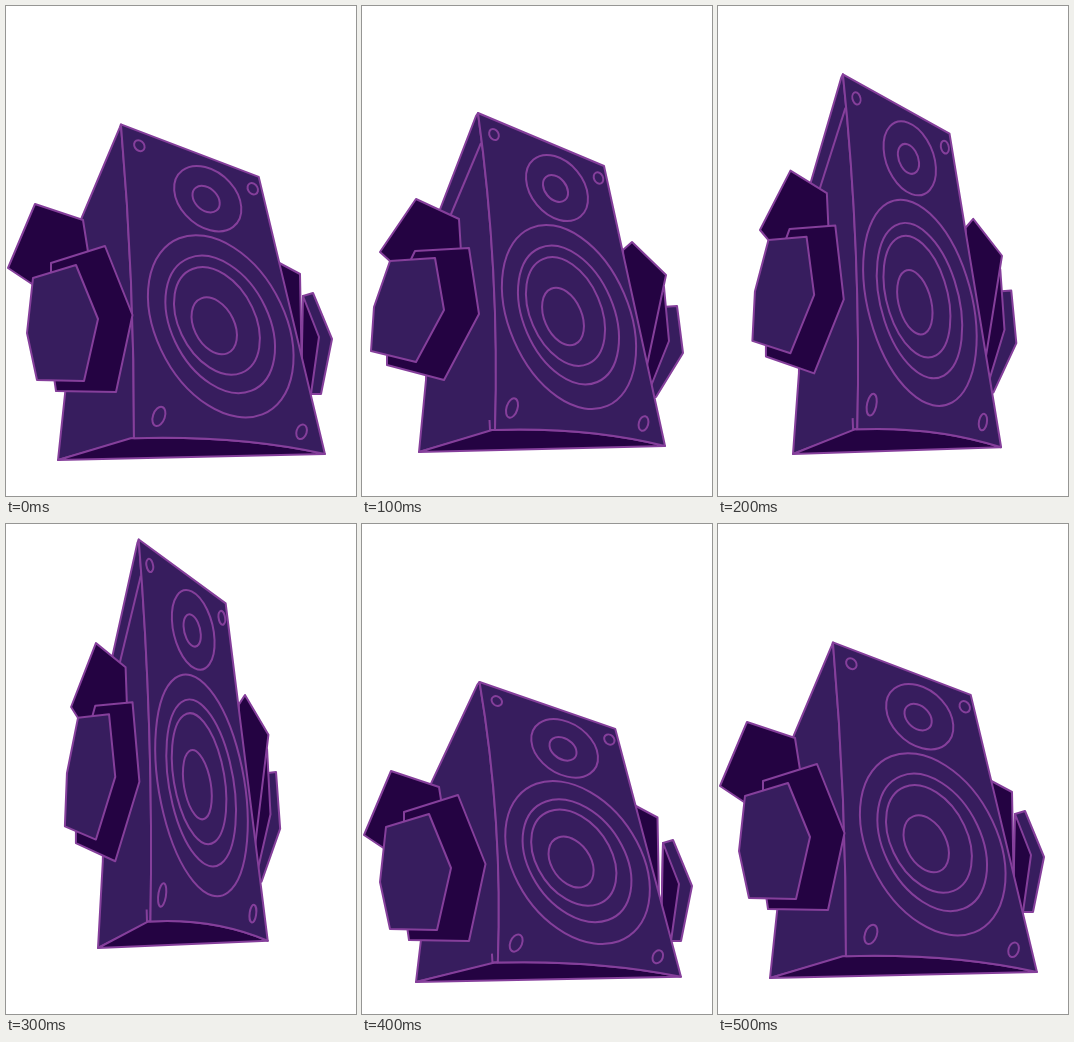
An HTML page with a canvas that plays this animation: 350 px wide and 490 px high, repeating every 600 ms.

```html
<!DOCTYPE html>
<html>
<head>
<meta charset="utf-8">
<style>
  html, body { margin: 0; height: 100%; overflow: hidden; background: #fff; }
  canvas { display: block; }
</style>
</head>
<body>
<canvas id="stage" width="350" height="490"></canvas>
<script>
const ctx = document.getElementById('stage').getContext('2d');
const LIGHT = '#371d5e', DARK = '#240342', LINE = '#853f9b';

// Each pose scales the speaker about its bottom left corner: scale x, scale y, corner x, corner y
const WIDE = [1.085, 0.99, 52, 454];
const POSES = [
  WIDE,
  [1, 1, 57, 446],
  [0.846, 1.12, 75, 448],
  [0.69, 1.205, 92, 424],
  [1.077, 0.885, 54, 458],
  WIDE
];
const STEP = 100;

// Fills and outlines SVG path data; the outline keeps its weight under scaling
function shape(d, fill, dx = 0, dy = 0) {
  const path = new Path2D();
  path.addPath(new Path2D(d), ctx.getTransform().translate(dx, dy));
  ctx.save();
  ctx.resetTransform();
  if (fill) {
    ctx.fillStyle = fill;
    ctx.fill(path);
  }
  ctx.stroke(path);
  ctx.restore();
}

function oval(x, y, rx, ry, tilt) {
  ctx.save();
  ctx.translate(x, y);
  ctx.rotate(tilt * Math.PI / 180);
  shape(`M${-rx} 0A${rx} ${ry} 0 1 1 ${rx} 0A${rx} ${ry} 0 1 1 ${-rx} 0Z`);
  ctx.restore();
}

const woofer = (x, y, s) => oval(x, y, 59.9 * s, 96.8 * s, -23.3);
const tweeter = (x, y, s) => oval(x, y, 26.2 * s, 36.9 * s, -39.5);

function body(plain, strip) {
  const [top, bend, foot] = plain ? [115, 127.5, 127] : [116, 138, 133];
  const edge = `${foot} 424Q${bend} 265 ${top} 107`;
  shape(`M114 110L67 232L64 374L57 446L${edge}Z`, LIGHT);
  if (strip) shape('M119 137L87 213');
  shape(`M57 446L${foot - 3} 424Q225 421 303 440Z`, DARK);
  shape(`M${top} 107L242 160L303 440Q225 421 ${edge}Z`, LIGHT);
  if (!plain) shape('M127.5 414L128 424L133 424');

  woofer(207, 311, 1);
  woofer(206.5, 309, 0.753);
  woofer(203.5, 305.5, 0.59);
  woofer(201, 310.5, 0.312);
  tweeter(195, 182, 1);
  tweeter(193.5, 182.5, 0.405);
  oval(132, 128.5, 4.5, 5.8, -30);
  oval(236.5, 172, 4.5, 6, -25);
  oval(150, 402, 5.5, 10, 17);
  oval(281.5, 417.5, 4.7, 7.5, 15);
}

function raisedRight() {
  shape('M300 301L315 300L321 347L294 391L280 391Z', LIGHT);
  shape('M302 281L307 335L279 405L270 367Z', DARK);
  shape('M261 244L270 236L304 269L280 383L265 346Z', DARK);
}

function raisedLeft() {
  shape('M54 193L97 213L100 262L60 280L29 256L18 246Z', DARK);
  shape('M53 245L107 242L117 308L82 374L25 359L25 335L42 268Z', DARK);
  shape('M28 255L73 252L82 304L54 356L9 345L12 301Z', LIGHT);
}

// When squashed, the hands keep their size and only shift
function loweredRight(low) {
  const dx = low ? 4 : 0, dy = low ? 29 : 0;
  shape('M297 290L307 287L326 333L315 388L295 388Z', LIGHT, dx, dy);
  shape('M297 290L313 331L305 388L295 388Z', DARK, dx, dy);
  shape('M264 252L294 268L296 375L280 352Z', DARK, low ? 1.5 : 0, low ? 25.5 : 0);
}

function loweredLeft(low) {
  const dx = low ? -3 : 0, dy = low ? 31 : 0;
  shape('M29 198L77 214L83 252L26 278L2 262Z', DARK, 0, low ? 49 : 0);
  shape('M45 257L99 240L126.5 309L110 386L50 385L45 350Z', DARK, dx, dy);
  shape('M27 272L70 259L92 313L78 375L31 374L21 327Z', LIGHT, dx, dy);
}

function draw(now) {
  const pose = POSES[Math.floor(now / STEP) % POSES.length];
  const [sx, sy, x, y] = pose;
  const raised = sx <= 1, low = sy < 0.9;
  const place = () => ctx.setTransform(sx, 0, 0, sy, x - 57 * sx, y - 446 * sy);

  ctx.resetTransform();
  ctx.clearRect(0, 0, 350, 490);
  ctx.strokeStyle = LINE;
  ctx.lineWidth = 2;
  ctx.lineJoin = 'round';

  if (raised) {
    place();
    raisedRight();
    body(false, true);
    raisedLeft();
  } else {
    loweredRight(low);
    place();
    body(!low, false);
    ctx.resetTransform();
    loweredLeft(low);
  }
}

function tick() {
  draw(performance.now());
  requestAnimationFrame(tick);
}
tick();
</script>
</body>
</html>
```
